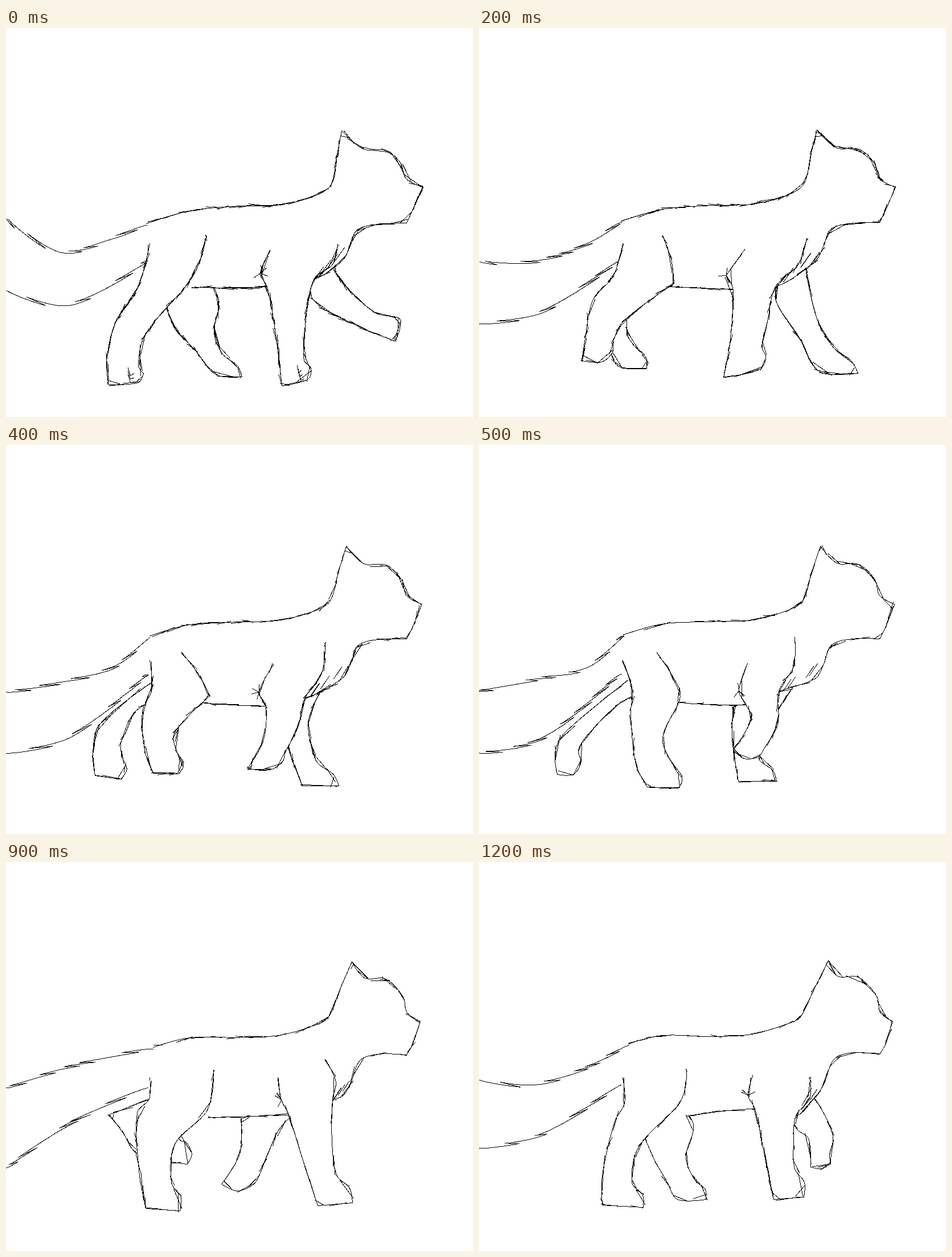
Animation, 820 px wide and 683 px high, one loop 1.3 s. Source, as an HTML page:

```html
<!DOCTYPE html>
<html lang="en">
<head>
<meta charset="utf-8">
<title>Walking cat</title>
<style>
  html, body { margin: 0; width: 100%; height: 100%; overflow: hidden; background: #fff; }
  svg { display: block; width: 820px; height: 683px; }
  path { fill: none; stroke: #000; stroke-width: 1; shape-rendering: crispEdges; }
  .solid { fill: #fff; }
</style>
</head>
<body>
<svg viewBox="0 0 820 683"><g id="cat" transform="translate(.5 .5)"></g></svg>
<script>
const STEP = 100, COUNT = 13;
const parse = s => s.split(' ').map(p => p.split(',').map(Number));

// Body outline from rump over ear and face to chest: x, y and drift per drawing.
const body = parse('246,343,1.3,-2 320,321,0,-1.4 410,312,0,-.5 480,310,0,-.7 545,293,0,-.9 572,272,-.7,0 581,222,.6,0 589,180,2,-.6 ' +
  '627,212,.2,-1 666,214,0,-1 692,236,.5,0 702,264,.2,0 732,279,-.6,0 714,318,0,0 703,342,0,-.4 655,344,0,-.8 616,354,.6,-.7 604,382,0,.8 590,408,0,.3');

// Leg joints, back to front: hock or elbow, ankle, heel, toe, instep, shin, knee or chest.
// Tail: points of the upper edge, then of the lower edge.
const poses = [
  { at: 0,
    tailTop: '0,336 95,393 190,368', tailLow: '0,462 110,486',
    farFore: '540,478 620,524 682,549 689,535 688,508 645,498 578,430',
    farHind: '293,522 330,563 368,608 414,612 380,572 365,535 373,478',
    nearHind: '192,516 176,585 180,626 232,622 232,592 244,538 322,444',
    nearFore: '458,454 472,530 484,628 530,616 523,583 524,530 540,441' },
  { at: 1,
    tailTop: '0,385 95,398 190,370', tailLow: '0,498 110,485',
    farFore: '527,485 575,535 610,600 684,605 645,562 610,515 583,455',
    farHind: '248,540 285,582 315,606 350,600 316,560 312,533 325,485',
    nearHind: '187,490 158,575 138,616 175,619 211,580 240,530 322,456',
    nearFore: '447,456 457,540 457,626 525,608 513,575 512,530 518,450' },
  { at: 3,
    tailTop: '0,437 95,422 190,388', tailLow: '0,543 110,512',
    farFore: '514,467 545,545 585,606 646,606 602,563 580,515 572,440',
    farHind: '178,475 171,540 175,582 238,595 234,561 208,540 208,478',
    nearHind: '212,465 213,520 222,552 256,552 259,520 268,497 362,440',
    nearFore: '444,460 424,559 401,600 460,590 480,545 500,500 522,458' },
  { at: 5,
    tailTop: '0,433 95,412 190,390', tailLow: '0,542 110,515',
    farFore: '446,460 444,515 455,590 522,590 492,553 491,540 491,520',
    farHind: '150,505 133,540 137,578 165,578 174,535 195,503 258,446',
    nearHind: '266,470 275,560 295,600 350,602 345,570 322,515 353,440',
    nearFore: '468,455 478,480 446,535 465,550 500,533 524,490 526,432' },
  { at: 7,
    tailTop: '0,422 95,392 190,346', tailLow: '0,531 110,505',
    farFore: '428,455 401,525 405,575 478,577 453,550 462,520 491,465',
    farHind: '100,498 74,518 85,538 110,533 127,510 150,470 215,437',
    nearHind: '262,500 267,562 280,610 343,606 338,576 309,525 349,430',
    nearFore: '483,443 530,515 590,605 645,600 615,550 592,500 558,420' },
  { at: 9,
    tailTop: '0,398 95,364 190,340', tailLow: '0,538 110,460',
    farFore: '412,450 410,512 378,565 405,577 445,548 456,520 486,460',
    farHind: '181,443 205,475 230,511 318,530 316,492 305,488 300,465',
    nearHind: '230,440 234,550 246,608 305,612 290,562 296,495 350,440',
    nearFore: '495,441 520,520 547,603 608,598 580,549 572,490 573,416' },
  { at: 12,
    tailTop: '0,384 95,391 190,360', tailLow: '0,504 110,478',
    farFore: '558,469 578,485 582,535 602,538 615,515 621,480 594,422',
    farHind: '304,515 330,562 348,592 398,592 378,557 363,518 376,460',
    nearHind: '238,455 216,550 216,602 288,606 268,562 280,500 350,425',
    nearFore: '484,433 502,520 517,592 570,588 554,538 552,490 556,445' }
];

const mix = (a, b, t) => [a[0] + (b[0] - a[0]) * t, a[1] + (b[1] - a[1]) * t];
const shift = (p, x, y) => [p[0] + x, p[1] + y];
const dist = (a, b) => Math.hypot(b[0] - a[0], b[1] - a[1]);
const line = pts => 'M' + pts.map(p => p[0].toFixed(1) + ' ' + p[1].toFixed(1)).join('L');

function randomizer(seed) {
  let s = seed * 7919 + 17;
  return () => (s = (s * 16807 + 11) % 2147483647) / 2147483647;
}

// Spline through the points, sampled about every 4 px; sharp turns stay corners.
function smooth(pts) {
  const slope = pts.map((p, i) => {
    const a = pts[i - 1], b = pts[i + 1];
    if (!a || !b) return [0, 0];
    const da = dist(a, p), db = dist(p, b);
    const cos = ((p[0] - a[0]) * (b[0] - p[0]) + (p[1] - a[1]) * (b[1] - p[1])) / (da * db);
    return cos < .5 ? [0, 0] : [(b[0] - a[0]) / (da + db), (b[1] - a[1]) / (da + db)];
  });
  const out = [pts[0]];
  for (let i = 1; i < pts.length; i++) {
    const a = pts[i - 1], b = pts[i], k = dist(a, b) / 3, steps = Math.ceil(k * 3 / 4);
    const c = shift(a, slope[i - 1][0] * k, slope[i - 1][1] * k);
    const d = shift(b, -slope[i][0] * k, -slope[i][1] * k);
    for (let j = 1; j <= steps; j++) {
      const t = j / steps, m = mix(c, d, t);
      out.push(mix(mix(mix(a, c, t), m, t), mix(m, mix(d, b, t), t), t));
    }
  }
  return out;
}

// Point beside sample i of a curve.
function beside(pts, i, off) {
  const a = pts[Math.max(0, i - 1)], b = pts[Math.min(pts.length - 1, i + 1)], d = dist(a, b) || 1;
  return shift(pts[i], -(b[1] - a[1]) / d * off, (b[0] - a[0]) / d * off);
}

// Contour with short overlapping pencil strokes, some doubling back.
function sketch(pts, rough, rnd) {
  const last = pts.length - 1;
  let d = line(pts);
  for (let i = Math.floor(rnd() * 5); i < last; i += Math.ceil((3 + rnd() * 7) / rough)) {
    const j = Math.min(last, i + 5 + Math.floor(rnd() * 7)), off = (rnd() - .5) * 7;
    const stroke = [beside(pts, i, off), beside(pts, j, -off * .5)];
    if (rnd() < .35) stroke.push(beside(pts, (i + j) >> 1, off * .8));
    d += line(stroke);
  }
  return d;
}

// Contour of overlapping locks of hair.
function fur(pts, rnd) {
  const last = pts.length - 1, out = [];
  for (let i = 0, j = 0; j < last; i = j - 4) {
    j = Math.min(last, i + 9 + Math.floor(rnd() * 14));
    for (let k = i; k <= j; k++) out.push(beside(pts, k, 5 * (k - i) / (j - i) - 2));
    if (j < last) out.push(beside(pts, j - 5 - Math.floor(rnd() * 4), -3));
  }
  return line(out);
}

// Leg contour between its two upper ends, with a rounded paw.
function leg(top, joints, end) {
  const toe = joints[3], instep = joints[4], heel = joints[2];
  const d = dist(heel, toe) || 1;
  const cap = shift(mix(toe, instep, .5), (toe[0] - heel[0]) / d * 9, (toe[1] - heel[1]) / d * 9);
  return smooth([...top, ...joints.slice(0, 4), cap, ...joints.slice(4), ...end]);
}

function toes([, , heel, toe, instep]) {
  return [.2, .5, .8].map(t => {
    const p = mix(toe, instep, t), q = mix(p, heel, .35);
    return line(smooth([shift(q, 0, -12), shift(q, 4, 2), shift(mix(p, q, .4), 0, 4)]));
  }).join('');
}

function drawing(n) {
  const k = poses.findLastIndex(p => p.at <= n);
  const a = poses[k], b = poses[k + 1] || a;
  const t = a === b ? 0 : (n - a.at) / (b.at - a.at);
  const part = name => {
    const to = parse(b[name]);
    return parse(a[name]).map((p, i) => mix(p, to[i], t));
  };
  const rnd = randomizer(n + 1), rough = Math.max(.8, 1.8 * .9 ** n);
  const turn = 2 * Math.PI / COUNT;

  const nearHind = part('nearHind'), nearFore = part('nearFore');
  const trunk = body.map(([x, y, vx, vy]) => [x + vx * n, y + vy * n]);
  const chest = nearFore[6], elbow = shift(nearFore[0], -12, -24);
  const belly = [326 + 3.2 * n, 455 - .8 * n];
  const hip = [252, 378], thigh = [340 + 32 * Math.cos(turn * (n + 2.5)), 364];
  const arm = [464 + 1.4 * n, 390 - 1.4 * n];
  const breast = [566 + 16 * Math.cos(turn * n), 355 + 25 * Math.cos(turn * n)];

  const farForeLeg = leg([[530, 420]], part('farFore'), [[570, 395]]);
  const farHindLeg = leg([[262, 412]], part('farHind'), [[345, 420]]);
  const nearHindLeg = leg([hip, shift(mix(hip, nearHind[0], .5), 10, 6)], nearHind,
    [shift(mix(thigh, nearHind[6], .5), 5, 0), thigh]);
  const nearForeLeg = leg([arm, elbow], nearFore, [shift(mix(breast, chest, .5), 12, 4), breast]);

  // Tuft at the elbow and hatching on the chest.
  let marks = '';
  for (let i = 0; i < 4; i++) {
    const turned = rnd() * 6, from = mix(trunk.at(-2), chest, .2 + rnd() * .7);
    marks += line([elbow, shift(elbow, 14 * Math.cos(turned), 14 * Math.sin(turned))]);
    marks += line([shift(from, 6, -12), shift(from, -8 * rough, 9 * rough)]);
  }
  if (rough > 1.5) marks += toes(nearHind) + toes(nearFore);

  return [
    sketch(farForeLeg, rough, rnd),
    sketch(farHindLeg, rough, rnd),
    fur(smooth([...part('tailTop'), trunk[0]]), rnd),
    fur(smooth([...part('tailLow'), [248, 408 - 1.6 * n]]), rnd),
    sketch(smooth([...trunk, chest, nearFore[0], belly]), rough, rnd),
    sketch(nearHindLeg, rough, rnd),
    sketch(nearForeLeg, rough, rnd),
    marks
  ];
}

const drawings = Array.from({ length: COUNT }, (_, n) => drawing(n));
const solid = [4, 5, 6];
const paths = drawings[0].map((_, i) => {
  const path = document.createElementNS('http://www.w3.org/2000/svg', 'path');
  if (solid.includes(i)) path.classList.add('solid');
  return document.getElementById('cat').appendChild(path);
});

let shown = -1;
function tick() {
  const n = Math.floor(performance.now() / STEP) % COUNT;
  if (n !== shown) paths.forEach((p, i) => p.setAttribute('d', drawings[n][i]));
  shown = n;
  requestAnimationFrame(tick);
}
tick();
</script>
</body>
</html>
```
